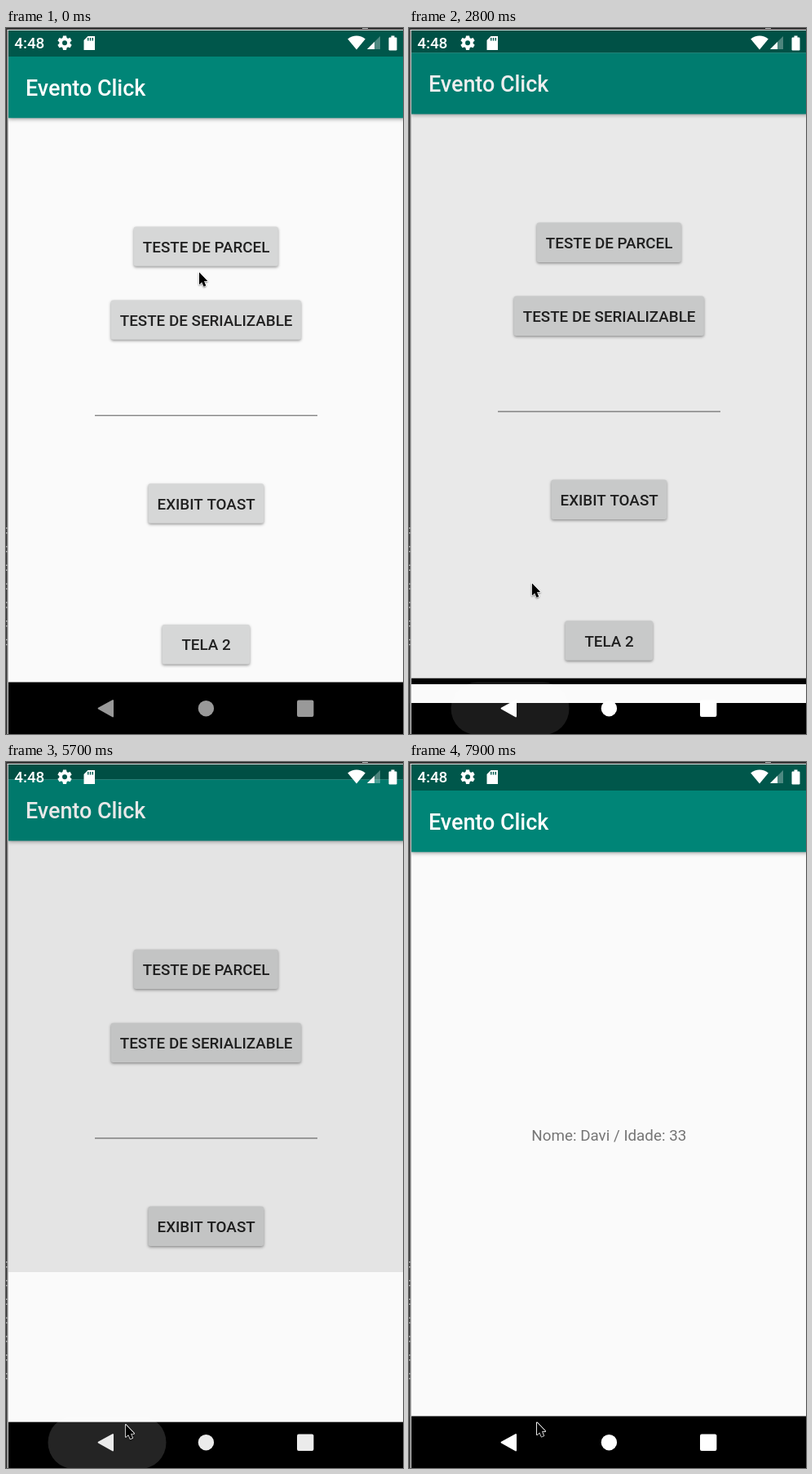
An HTML page with a canvas that plays this animation: 487x865 px, repeating every 8 s.

```html
<!DOCTYPE html>
<html lang="pt">
<head>
<meta charset="utf-8">
<title>Evento Click</title>
<style>
html, body { margin: 0; width: 100%; height: 100%; overflow: hidden; background: #000; }
canvas { display: block; width: 487px; height: 865px; }
</style>
</head>
<body>
<canvas id="stage" width="487" height="865"></canvas>
<script>
const ctx = document.getElementById('stage').getContext('2d');
const W = 487, H = 865, LOOP = 8000, STEP = 100;
const EDGE = 3, SCREEN_W = W - EDGE, SCREEN_H = H - EDGE;
const DP = SCREEN_W / 360;
const MID = EDGE + SCREEN_W / 2 + 0.3;
const BAR_Y = 35, BAR_H = 56 * DP, NAV_Y = 801.5, NAV_MID = 833.7;
const BUTTON_H = 36 * DP, TEXT_SIZE = 14 * DP;
const TRANSITION = 425, TAP_LEAD = 100;

const BUTTONS = [
  { label: 'TESTE DE PARCEL', y: 267.6 },
  { label: 'TESTE DE SERIALIZABLE', y: 357.6 },
  { label: 'EXIBIT TOAST', y: 582.5 },
  { label: 'TELA 2', y: 755.3 }
];

// Each visit to the detail screen, with the button that opens it.
const VISITS = [
  { open: 534, close: 2604, button: 0, text: 'Nome: Davi Vendal / Código: 1' },
  { open: 3569, close: 5600, button: 1, text: 'Nome: Davi Vendal Serializable / Código: 1' },
  { open: 7094, close: Infinity, button: 3, text: 'Nome: Davi / Idade: 33' }
];

// Pointer legs: departure, arrival, destination.
const LEGS = [
  { from: 0, to: 300, x: 236, y: 270 },
  { from: 1100, to: 1500, x: 22, y: 24 },
  { from: 1500, to: 2000, x: 150, y: 725 },
  { from: 2000, to: 2400, x: 106, y: 846 },
  { from: 2480, to: 3300, x: 239, y: 355 },
  { from: 4100, to: 5250, x: 139, y: 827 },
  { from: 5600, to: 6200, x: 246, y: 620 },
  { from: 6200, to: 6800, x: 246, y: 752 },
  { from: 7400, to: 7900, x: 157, y: 809 }
];

const clamp = v => Math.min(1, Math.max(0, v));
const lerp = (a, b, k) => a + (b - a) * k;
const smooth = k => k * k * (3 - 2 * k);

function bezier(x, xs, ys) {
  const at = (p, u) => {
    const v = 1 - u;
    return p[0] * v ** 3 + 3 * p[1] * u * v * v + 3 * p[2] * u * u * v + p[3] * u ** 3;
  };
  let lo = 0, hi = 1;
  for (let i = 0; i < 24; i++) {
    const mid = (lo + hi) / 2;
    if (at(xs, mid) < x) lo = mid; else hi = mid;
  }
  return at(ys, lo);
}
const fastOutSlowIn = x => bezier(x, [0, 0.4, 0.2, 1], [0, 0, 1, 1]);
const closeDim = x => bezier(x, [0, 0.33, 1, 1], [0, 0, 1, 1]);
const extraSlowIn = x => x < 1 / 6
  ? bezier(x, [0, 0.05, 0.1333, 1 / 6], [0, 0, 0.06, 0.4])
  : bezier(x, [1 / 6, 0.2083, 0.25, 1], [0.4, 0.82, 1, 1]);

function pointerAt(t) {
  let x = 237, y = 299;
  for (const leg of LEGS) {
    const k = smooth(clamp((t - leg.from) / (leg.to - leg.from)));
    x = lerp(x, leg.x, k);
    y = lerp(y, leg.y, k);
  }
  return { x, y };
}

// Navigation icons light up on a tap and dim again when left alone.
function navLight(t) {
  let light = 0.6;
  for (const { close } of VISITS) {
    const age = t - close + TAP_LEAD;
    if (age < 0) break;
    light = lerp(light, 1, clamp(age / 250)) - 0.4 * clamp((age - 2540) / 670);
  }
  return light;
}

function rect(x, y, w, h, color) {
  ctx.fillStyle = color;
  ctx.fillRect(x, y, w, h);
}

function roundRect(x, y, w, h, r, color) {
  ctx.beginPath();
  ctx.roundRect(x, y, w, h, r);
  ctx.fillStyle = color;
  ctx.fill();
}

function circle(x, y, r, color) {
  ctx.beginPath();
  ctx.arc(x, y, r, 0, 7);
  ctx.fillStyle = color;
  ctx.fill();
}

function polygon(points, color, outline) {
  ctx.beginPath();
  points.forEach(([x, y]) => ctx.lineTo(x, y));
  ctx.closePath();
  if (outline) {
    ctx.lineWidth = 2;
    ctx.lineJoin = 'round';
    ctx.strokeStyle = outline;
    ctx.stroke();
  }
  ctx.fillStyle = color;
  ctx.fill();
}

function text(str, x, y, size, weight, color, align = 'center') {
  ctx.font = `${weight} ${size}px Roboto, sans-serif`;
  ctx.textAlign = align;
  ctx.fillStyle = color;
  ctx.fillText(str, x, y);
  return ctx.measureText(str).width;
}

function withShadow(alpha, blur, dy, draw) {
  ctx.save();
  ctx.shadowColor = `rgba(0,0,0,${alpha})`;
  ctx.shadowBlur = blur;
  ctx.shadowOffsetY = dy;
  draw();
  ctx.restore();
}

function drawWindow(content) {
  rect(EDGE, EDGE, W, SCREEN_H, '#fafafa');
  withShadow(0.4, 5, 1.5, () => rect(EDGE, BAR_Y, W, BAR_H, '#008577'));
  rect(EDGE, EDGE - 1, W, BAR_Y - EDGE + 1, '#00574b');
  text('Evento Click', 24, 82.5, 20 * DP, 500, '#fff', 'left');
  content();
  rect(EDGE, NAV_Y, W, H, '#000');
}

function drawButton({ label, y }, held, pointer) {
  ctx.font = `500 ${TEXT_SIZE}px Roboto, sans-serif`;
  const w = Math.max(80 * DP, ctx.measureText(label).width + 16 * DP);
  const box = [MID - w / 2, y - BUTTON_H / 2, w, BUTTON_H, 2 * DP];
  withShadow(0.4, 3.5, 1.5, () => roundRect(...box, '#d6d7d7'));
  if (held >= 0 && held < 500) {
    ctx.save();
    ctx.clip();
    circle(pointer.x, pointer.y, lerp(25, w, clamp(held / 225)),
      `rgba(0,0,0,${0.14 * clamp((500 - held) / 350)})`);
    ctx.restore();
  }
  text(label, MID + 0.3, y + 7, TEXT_SIZE, 500, '#212121');
}

function drawMain(t, pointer) {
  BUTTONS.forEach((button, i) => {
    const visit = VISITS.find(v => v.button === i);
    drawButton(button, visit ? t - visit.open + TAP_LEAD : -1, pointer);
  });
  rect(109, 474, 273, 1.4, '#858585');
}

function drawScreens(t, pointer) {
  const visit = VISITS.filter(v => t >= v.open).pop();
  let shown = 0, revealed = 0, dim = 0;
  if (visit) {
    const closing = t >= visit.close;
    const age = t - (closing ? visit.close : visit.open);
    const k = clamp(age / TRANSITION);
    const flip = v => closing ? 1 - v : v;
    shown = flip(fastOutSlowIn(k));
    revealed = flip(extraSlowIn(k));
    dim = 0.1 * (closing ? 1 - closeDim(k) : clamp(age / 117));
  }

  ctx.save();
  ctx.translate(0, -0.02 * SCREEN_H * shown);
  drawWindow(() => drawMain(t, pointer));
  ctx.restore();
  rect(EDGE, EDGE, W, H, `rgba(0,0,0,${dim})`);
  rect(EDGE, H - 18, W, 18, '#000');
  if (revealed < 0.001) return;

  ctx.save();
  ctx.translate(0, 0.041 * SCREEN_H * (1 - shown));
  ctx.beginPath();
  ctx.rect(EDGE, EDGE + 0.959 * SCREEN_H * (1 - revealed), W, SCREEN_H);
  ctx.clip();
  drawWindow(() => text(visit.text, MID, 463.8, TEXT_SIZE, 400, '#757575'));
  ctx.restore();
}

function drawGear(x, y) {
  ctx.save();
  ctx.translate(x, y);
  for (let i = 0; i < 6; i++) {
    ctx.rotate(Math.PI / 3);
    polygon([[-3, -4], [-2, -8.8], [2, -8.8], [3, -4]], '#fff');
  }
  circle(0, 0, 6.6, '#fff');
  circle(0, 0, 3, '#00574b');
  ctx.restore();
}

function drawStatus() {
  text('4:48', 10.2, 25.2, TEXT_SIZE, 500, '#fff', 'left');
  drawGear(72, 18.2);
  polygon([[100.5, 10], [109, 10], [109, 27], [95.5, 27], [95.5, 15]], '#fff');
  for (let i = 0; i < 3; i++) rect(100 + i * 2.8, 12, 1.4, 3.6, '#00574b');

  ctx.beginPath();
  ctx.moveTo(430, 26.5);
  ctx.arc(430, 26.5, 17, -Math.PI / 2 - 0.69, -Math.PI / 2 + 0.69);
  ctx.fillStyle = '#fff';
  ctx.fill();
  const signal = (size, color) =>
    polygon([[443 + size, 26 - size], [443 + size, 26], [443, 26]], color);
  signal(16, 'rgba(255,255,255,.3)');
  signal(9, '#fff');
  roundRect(469.5, 11.5, 10, 16, 1.2, '#fff');
  rect(472.5, 9.5, 4, 3, '#fff');
}

function drawNav(t) {
  for (const { close } of VISITS) {
    const age = t - close + TAP_LEAD;
    if (!(age >= 0 && age < 590)) continue;
    const half = 72.5 * lerp(0.6, 1, clamp(age / 200));
    const alpha = 0.18 * clamp(age / 60) * clamp((590 - age) / 500);
    roundRect(124 - half, NAV_Y, half * 2, 48 * DP, 32, `rgba(255,255,255,${alpha})`);
  }
  const level = Math.round(255 * navLight(t));
  const color = `rgb(${level},${level},${level})`;
  polygon([[113.6, NAV_MID], [131, NAV_MID - 9.7], [131, NAV_MID + 9.7]], color, color);
  circle(245.4, NAV_MID, 9.7, color);
  roundRect(357, NAV_MID - 10.2, 20.4, 20.4, 2, color);
}

function drawBackdropEdge() {
  rect(0, 0, W, 2, '#363636');
  rect(0, 0, 2, H, '#363636');
  rect(1.6, 2, W, 1, '#e4e4e4');
  rect(1.6, 2, 1.2, H, '#e4e4e4');
  rect(437, 0, 7, 1, '#c8c8c8');
  for (let y = 612; y < 770; y += 22.8) {
    rect(0, y, 1.6, 1.4, '#bbb');
    rect(0, y + 6, 1.6, 1.4, '#bbb');
  }
}

function drawPointer({ x, y }) {
  ctx.save();
  ctx.translate(x, y);
  const shape = [[0, 0.5], [0, 15], [3.3, 12], [5.7, 17.4], [8, 16.4], [5.7, 11], [10, 11]];
  withShadow(0.35, 2, 1, () => polygon(shape, '#000', '#fff'));
  polygon(shape, '#000');
  ctx.restore();
}

function render(now) {
  const t = Math.floor((now % LOOP) / STEP) * STEP;
  const pointer = pointerAt(t);
  rect(0, 0, W, H, '#000');
  drawScreens(t, pointer);
  drawStatus();
  drawNav(t);
  drawBackdropEdge();
  drawPointer(pointer);
}

const start = performance.now();
function tick() {
  render(performance.now() - start);
  requestAnimationFrame(tick);
}
tick();
</script>
</body>
</html>
```
